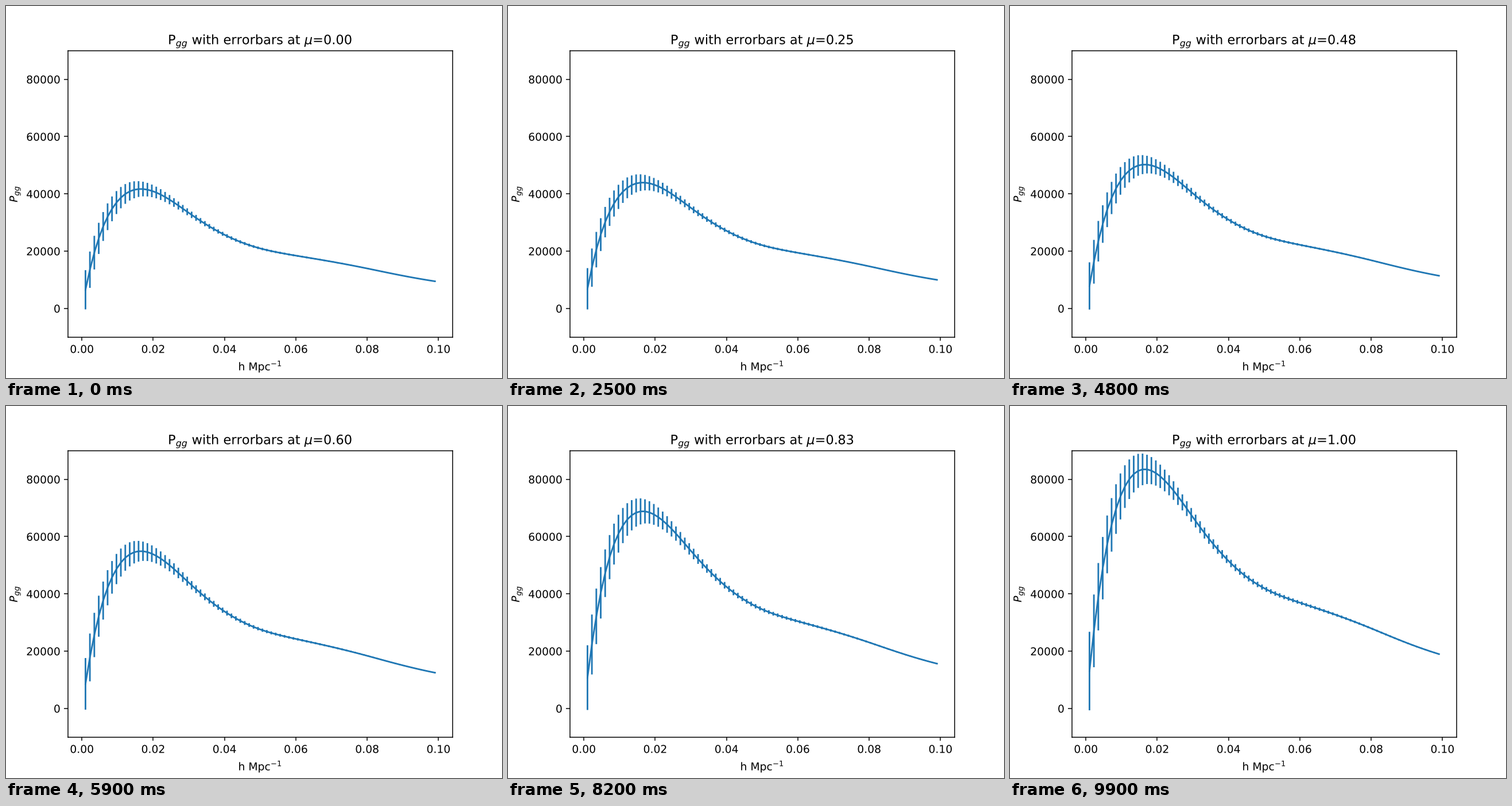
Animation, 864 px wide and 648 px high, one loop 10000 ms. Source, as a matplotlib script:

```python
import numpy as np
import matplotlib.pyplot as plt
from matplotlib.animation import FuncAnimation
from matplotlib.patheffects import Normal

FRAMES = 100
BETA = 0.415         # growth rate over bias
MODE_NOISE = 1.05e-3  # relative error times k


def spline(xs, ys, x):
    """Natural cubic spline through (xs, ys), evaluated at x."""
    h = np.diff(xs)
    slope = np.diff(ys) / h
    a = np.eye(len(xs))
    rhs = np.zeros(len(xs))
    for i in range(1, len(xs) - 1):
        a[i, i - 1:i + 2] = h[i - 1], 2 * (h[i - 1] + h[i]), h[i]
        rhs[i] = 6 * (slope[i] - slope[i - 1])
    m = np.linalg.solve(a, rhs)
    j = np.clip(np.searchsorted(xs, x, side="right") - 1, 0, len(h) - 1)
    t = x - xs[j]
    return (ys[j] + t * (slope[j] - h[j] * (2 * m[j] + m[j + 1]) / 6)
            + t**2 * m[j] / 2 + t**3 * (m[j + 1] - m[j]) / (6 * h[j]))


# The spectrum is smooth in log-log space, so a few key points fix it.
key_k = np.array([0.001, 0.00472, 0.00968, 0.01589, 0.02581,
                  0.03822, 0.05062, 0.06551, 0.08039, 0.099])
key_p = np.array([6518, 24453, 36959, 41679, 36984,
                  26870, 20752, 17296, 13860, 9480])
k = np.linspace(0.001, 0.099, 80)
base = np.exp(spline(np.log(key_k), np.log(key_p), np.log(k)))

# Outlined, unhinted text keeps its sub-pixel position.
plt.rcParams.update({"font.family": "DejaVu Sans", "text.hinting": "none",
                     "path.effects": [Normal()]})
fig, ax = plt.subplots(figsize=(6.4, 4.8), dpi=135)
line, _, (bars,) = ax.errorbar(k, base, yerr=base * MODE_NOISE / k)
bars.set_snap(False)
ax.set_xlim(-0.0039, 0.1039)
ax.set_ylim(-10000, 90000)
ax.set_xlabel("h Mpc$^{-1}$")
ax.set_ylabel("$P_{gg}$")
title = ax.set_title("")


def update(i):
    mu = i / (FRAMES - 1)
    p = base * (1 + BETA * mu**2) ** 2
    err = p * MODE_NOISE / k
    line.set_ydata(p)
    ends = np.stack([p - err, p + err], axis=1)
    bars.set_segments(np.dstack([np.column_stack([k, k]), ends]))
    title.set_text(rf"P$_{{gg}}$ with errorbars at $\mu$={mu:.2f}")
    return line, bars, title


anim = FuncAnimation(fig, update, frames=FRAMES, interval=100,
                     repeat=True, repeat_delay=0)
plt.show()
```
